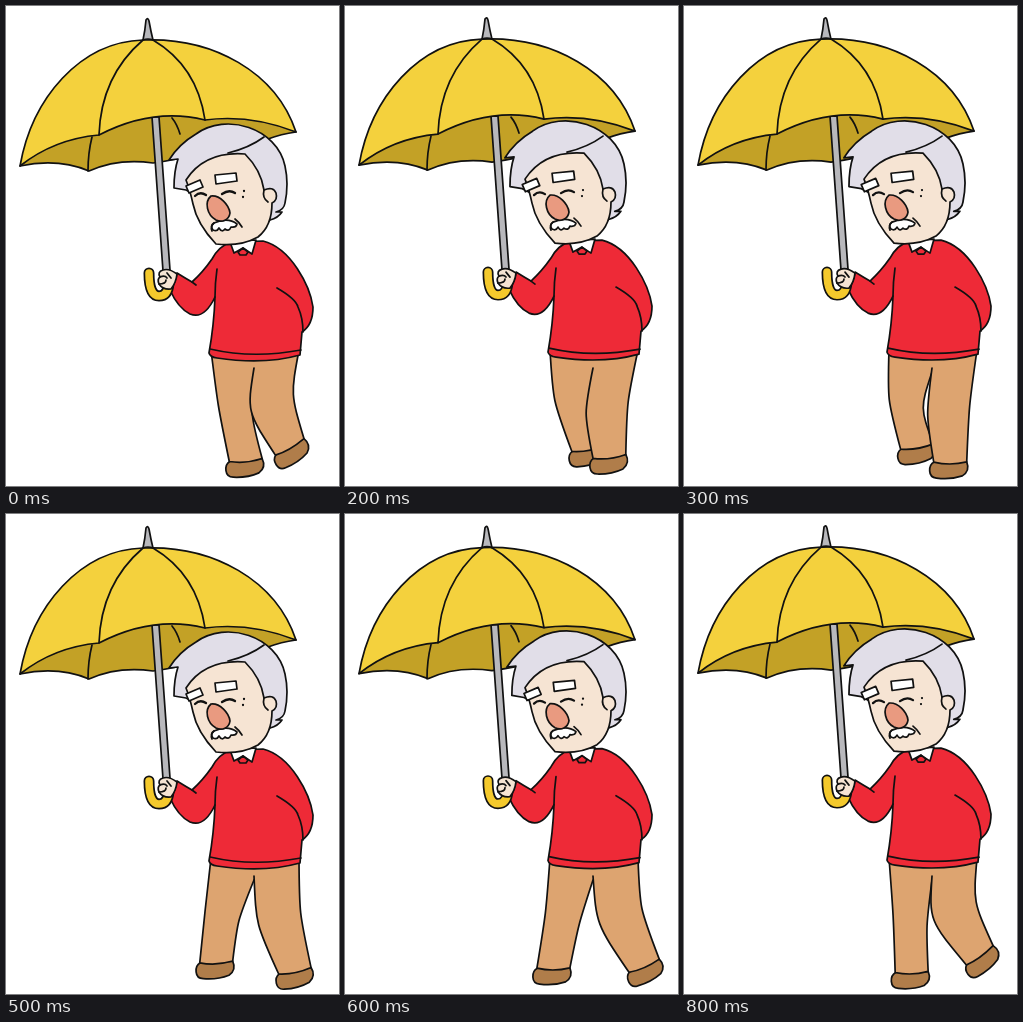
Write an HTML page that moves like this. It is 333 px wide and 480 px high and loops after 0.9 s.

```html
<!DOCTYPE html>
<html lang="en">
<head>
<meta charset="utf-8">
<title>Walking with an umbrella</title>
<style>
  html, body { margin: 0; width: 100%; height: 100%; overflow: hidden; background: #fff; }
  svg { display: block; width: 100%; height: 100%; }
  path { stroke: #111; stroke-width: 1.7; stroke-linejoin: round; stroke-linecap: round; fill: none; }
  .flat { stroke: none; }
  .yellow { fill: #f4d13d; }
  .shade { fill: #c3a126; }
  .steel { fill: #b8b8bc; }
  .skin { fill: #f6e4d3; }
  .hair { fill: #e1dee8; }
  .red { fill: #ee2a37; }
  .white { fill: #fff; }
  .trousers { fill: #dda470; }
  .shoe { fill: #b07d4a; }
  .nose { fill: #e99a80; }
  .rim { stroke-width: 11; }
  .grip { stroke: #f4c92c; stroke-width: 7.6; }
  .lids { stroke-width: 2.3; }
</style>
</head>
<body>
<svg viewBox="0 0 333 480">
  <g id="legs"></g>
  <g id="upper">
    <!-- umbrella -->
    <path class="shade" d="M14 160Q52 152 83 165Q112 152 147 157Q170 154 190 148L262 133Q275 128 290 126L260 95L93 110L50 125Z"/>
    <path d="M86 131Q82 147 82 165M166 112Q171 118 174 128"/>
    <path class="steel" d="M146 111L153 111L164 264L157 265Z"/>
    <path class="yellow" d="M14 160C26 92 74 36 137 34C207 31 270 66 290 126Q244 108 199 114Q147 101 93 129Q48 133 14 160Z"/>
    <path d="M137 34Q95 70 93 129M147 34Q191 60 199 114"/>
    <path class="steel" d="M137 34Q139 25 140 14Q142 11 143 15Q145 26 147 34Q142 32 137 34Z"/>

    <!-- sweater and arms -->
    <path class="red" d="M225 236Q213 240 206 253Q197 266 186 276Q179 272 171 267Q170 276 164 284Q172 302 184 308Q198 314 209 291Q208 319 203 347Q204 351 211 352Q258 359 294 349L296 326Q307 319 307 301C304 280 285 242 257 235Z"/>
    <path d="M211 263Q209 277 209 291M186 276L190 279M271 282Q290 293 292 301Q297 312 297 326M204 343Q247 353 295 344"/>

    <!-- handle and hand -->
    <path class="rim" d="M143 267Q143 290 153 290Q162 290 163 277"/>
    <path class="grip" d="M143 267Q143 290 153 290Q162 290 163 277"/>
    <path class="skin" d="M157 264Q163 262 171 268Q170 277 165 283Q157 284 153 278Q151 273 154 271Q151 266 157 264Z"/>
    <path d="M154 271Q159 269 161 272M153 278Q160 278 160 274M161 267L165 272"/>

    <!-- head -->
    <path class="white" d="M224 236L228 247L237 242L246 248L250 234Z"/>
    <path class="red" d="M232 246L237 242L242 246L240 249L234 249Z"/>
    <path class="hair scalp" d="M190 128Q173 138 163 154L172 153Q168 165 168 182L180 184L255 222L264 214Q272 212 276 206L270 206Q278 204 279 197Q283 178 279 160C271 122 220 106 190 128Z"/>
    <path class="skin" d="M180 174Q184 184 187 198Q191 218 210 238Q234 241 252 231Q266 220 266 197Q272 194 270 187Q267 180 258 184Q255 164 239 148Q199 145 180 174Z"/>
    <path d="M258 184Q256 192 262 196M222 147Q243 142 258 131"/>
    <path class="white scalp" d="M180 180L194 174L197 181L183 187ZM209 169L230 167L231 175L210 178Z"/>
    <path class="lids" d="M189 190Q194 185 200 189M216 188Q223 183 229 187M238 185h.01M237 191h.01"/>
    <path class="white" d="M208 217Q204 220 207 224Q211 226 213 222Q216 227 219 223Q223 226 225 221Q230 222 231 218Q222 211 208 217Z"/>
    <path d="M229 213Q233 216 236 221M208 217Q204 220 206 225"/>
    <path class="nose" d="M205 190C214 189 223 199 224 207C223 214 216 217 210 214C201 209 198 196 205 190Z"/>
  </g>
</svg>
<script>
  const STEP = 100, STEPS = 9;
  const legs = document.getElementById("legs");
  const upper = document.getElementById("upper");
  const scalps = document.querySelectorAll(".scalp");

  const wave = (steps, period = STEPS) => Math.cos(2 * Math.PI * steps / period);

  // A leg swings with its foot furthest back at step `peak`.
  const far = { hips: [[205, 344], [248, 366]], ankle: 227, knee: 223, width: 34, tilt: 5, peak: 1.2 };
  const near = { hips: [[248, 362], [293, 344]], ankle: 283, knee: 269, width: 42, tilt: 18, peak: 6.8 };

  // Both handles sit beyond the knee, so the curve bends sharply through it.
  function handle(hip, knee, ankle) {
    const x = knee + (knee - (hip[0] + ankle[0]) / 2) / 3;
    return `${x} ${(hip[1] + ankle[1]) / 2}`;
  }

  function leg({ hips: [h1, h2], ankle, knee, width, tilt, peak }, step) {
    const t = step - peak;
    const x = ankle + 19 * wave(t), y = 449.5 + 9 * wave(t + 2.7);
    const kneeX = knee + 7 * wave(t + 0.6);
    const angle = tilt * (wave(t + 3.5) - 1);
    const rad = angle * Math.PI / 180, half = 16.5;
    const dx = half * Math.cos(rad), dy = half * Math.sin(rad);
    const a = [x - dx, y - dy], b = [x + dx, y + dy];
    const c1 = handle(h1, kneeX - width / 2, a), c2 = handle(h2, kneeX + width / 2, b);
    const outline = `M${h1}C${c1} ${c1} ${a}Q${x} ${y + 4} ${b}C${c2} ${c2} ${h2}`;
    return `
      <path class="shoe" transform="translate(${x} ${y}) rotate(${angle})"
        d="M-16 0C-22 3 -23 15 -14 16Q0 18 12 14Q20 9 16.5 0Z"/>
      <path class="trousers flat" d="${outline}V344H${h1[0]}Z"/>
      <path d="${outline}"/>`;
  }

  function draw(step) {
    legs.innerHTML = leg(far, step) + leg(near, step);
    const bob = (1 - wave(step, 5)) / 2;
    upper.setAttribute("transform", `translate(0 ${-bob})`);
    for (const s of scalps)
      s.setAttribute("transform", `translate(280 200) scale(${1 + 0.03 * bob}) translate(-280 -200)`);
  }

  const start = performance.now();
  let shown = -1;
  function tick() {
    const step = Math.floor((performance.now() - start) / STEP) % STEPS;
    if (step !== shown) draw(shown = step);
    requestAnimationFrame(tick);
  }
  tick();
</script>
</body>
</html>
```
